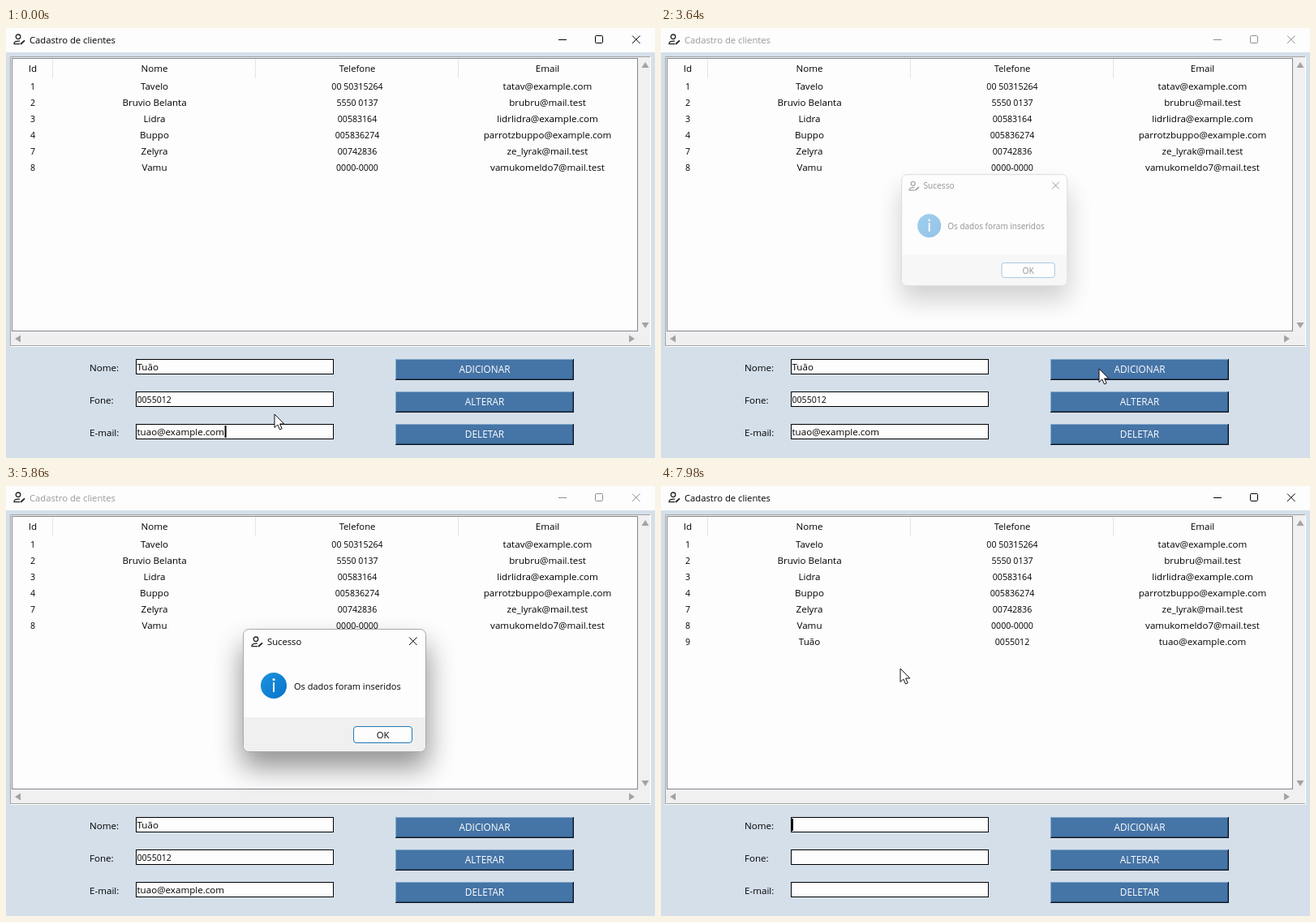
Animation, 800 px wide and 530 px high, one loop 8000 ms. Source, as an HTML page:

```html
<!DOCTYPE html>
<html lang="pt">
<head>
<meta charset="utf-8">
<title>Cadastro de clientes</title>
<style>
  html, body { margin: 0; height: 100%; overflow: hidden; background: #d4dfea; }
  svg { display: block; width: 100%; height: 100%; }
  text { font: 11.6px "Open Sans", "Noto Sans", sans-serif; fill: #000; }
  .mid { text-anchor: middle; }
  .num { font-size: 10.6px; }
  .title { font-size: 11.25px; }
  .btn { font-size: 11.8px; fill: #fff; }
  .line { fill: none; stroke: #000; }
  .inactive text { fill: #999; }
  .inactive .line { stroke: #8e8e8e; }
  #dialog { transform-origin: 337px 221px; }
  #shade { opacity: .42; filter: blur(17px); }
</style>
</head>
<body>
<svg id="stage" viewBox="0 0 800 530"></svg>
<script>
const DURATION = 8000, OPEN = 3640, DONE = 6740;
const WHITE = '#fdfdfd', PALE = '#f0f0f0', BODY = '#d4dfea', GREY = '#a3a3a3';

const rect = (x, y, w, h, fill, more = '') =>
  `<rect x="${x}" y="${y}" width="${w}" height="${h}" fill="${fill}" ${more}/>`;
const path = (d, more = 'class="line"') => `<path d="${d}" ${more}/>`;
const text = (x, y, s, cls = '', id = '') => `<text x="${x}" y="${y}" class="${cls}" id="${id}">${s}</text>`;

const userIcon = (x, y) => `<g transform="translate(${x} ${y})" fill="none" stroke="#222" stroke-width="1.3">
  <circle cx="6" cy="3.8" r="2.8"/>
  <path d="M8 12.7H1V12C1 9.5 4 8.9 8 9.1"/><path d="M9 13L14 8.300" stroke-width="1.8"/></g>`;

const columns = [33, 183, 433, 667.5];
const clients = [
  [1, 'Tavelo', '00 50315264', 'tatav@example.com'],
  [2, 'Bruvio Belanta', '5550 0137', 'brubru@mail.test'],
  [3, 'Lidra', '00583164', 'lidrlidra@example.com'],
  [4, 'Buppo', '005836274', 'parrotzbuppo@example.com'],
  [7, 'Zelyra', '00742836', 'ze_lyrak@mail.test'],
  [8, 'Vamu', '0000-0000', 'vamukomeldo7@mail.test'],
  [9, 'Tuão', '0055012', 'tuao@example.com']
];
const added = clients[6];
const row = (cells, y, cls = ['num', '', 'num', '']) =>
  cells.map((s, i) => text(columns[i], y, s, 'mid ' + cls[i])).join('');

const titleBar = rect(0, 0, 800, 30, WHITE) + userIcon(9, 7) +
  `<g id="bar">${text(29, 19, 'Cadastro de clientes', 'title')}
  ${path('M681 14.5h10M772 9.5l9.5 9.5m0-9.5L772 19')}
  <rect class="line" x="726.5" y="9.5" width="9" height="9" rx="1.2"/></g>`;

const table = rect(5.5, 35.5, 789, 357, PALE, 'stroke="#fff"') +
  path('M5.5 392V35.5H794', `fill="none" stroke="${GREY}"`) +
  path('M6 391.5H794', `stroke="${GREY}"`) +
  rect(7.5, 37.5, 771, 336, WHITE, 'stroke="#828790"') +
  path('M57.5 38v24M307.5 38v24M557.5 38v24', 'stroke="#e5e5e5"') +
  row(['Id', 'Nome', 'Telefone', 'Email'], 54, ['', '', 'title', '']) +
  clients.slice(0, 6).map((c, i) => row(c, 76 + i * 20)).join('') +
  `<g id="newRow">${row(added, 196)}</g>` +
  path('M18 378.5v9l-7-4.5zM768 378.5v9l7-4.5z', `fill="${GREY}"`) +
  path('M783.5 49h9l-4.5-7zM783.5 363h9l-4.5 7z', `id="arrows" fill="${GREY}"`) +
  rect(787, 54, 2, 303, '#858585', 'id="thumb" rx="1"');

const form = ['Nome:', 'Fone:', 'E-mail:'].map((label, i) => {
  const y = 408 + i * 40;
  return text(103, y + 15, label) + rect(160.5, y + .5, 243, 18, WHITE, 'stroke="#000"') +
    text(161.5, y + 14, added[i + 1], (i == 1 ? 'num' : '') + ' value', 'value' + i);
}).join('') + rect(0, 0, 2, 15, '#000', 'id="caret"');

const buttons = ['ADICIONAR', 'ALTERAR', 'DELETAR'].map((label, i) => {
  const y = 408 + i * 40;
  return rect(480, y, 220, 26, '#0c1420') + rect(480, y, 219, 25, '#84a9cc') +
    rect(481, y + 1, 218, 24, '#2c4b6b') + rect(481, y + 1, 217, 23, '#4574a6') +
    text(590, y + 17, label, 'mid btn');
}).join('');

const dialog = `<g id="dialog">
  <rect id="shade" x="291" y="196" width="229" height="151" rx="8"/>
  ${rect(292.5, 176.5, 225, 151, WHITE, 'rx="7" stroke="#a8a8a8"')}
  ${path('M293 285H517V320.5a6.5 6.5 0 0 1-6.5 6.5H299.5a6.5 6.5 0 0 1-6.5-6.5z', `fill="${PALE}"`)}
  ${userIcon(302, 185)}${text(322, 196, 'Sucesso', 'title')}
  ${path('M497 186.5l9.5 9.5m0-9.5L497 196')}
  <circle cx="330" cy="246" r="16" fill="url(#info)"/>
  ${rect(329, 242, 2, 12, '#fff')}<circle cx="330" cy="238.5" r="1.5" fill="#fff"/>
  <text x="355" y="251" style="font-size:11px">Os dados foram inseridos</text>
  ${rect(428.5, 296.5, 72, 20, WHITE, 'id="ok" rx="3.5" stroke="#1f78b4"')}
  ${text(464.5, 311, 'OK', 'mid title')}</g>`;

const pointer = `<g id="cursor" fill="#fff" stroke="#111" stroke-linejoin="round">
  ${path('M0 0V16.5L3.8 13L6.5 19L9.2 17.8L6.6 12H11.8z', 'id="arrow"')}
  <g id="hand">
  ${path('M-1.5 13V1.5a1.7 1.7 0 0 1 3.4 0V7q1.5-1 3 .5q1.7-.7 2.8 .8q2-.5 2.8 1.5V15q0 3-2 5v2.5H0V20L-6 13.5q-1-2 1-2.3z', '')}
  ${path('M1.9 7v4M4.9 8v3.5M7.7 9v3', 'fill="none"')}</g></g>`;

stage.innerHTML = `<defs><linearGradient id="info" x2="1" y2="1">
  <stop stop-color="#1f93dc"/><stop offset="1" stop-color="#0573cc"/></linearGradient></defs>` +
  rect(0, 0, 800, 530, BODY) + titleBar + table + form + buttons + dialog + pointer;

const el = id => document.getElementById(id);
const show = (id, on) => el(id).style.display = on ? '' : 'none';

// time, x, y
const moves = [
  [0, 331, 476], [300, 331, 476], [1800, 540, 420], [4360, 540, 420], [4740, 530, 408],
  [5400, 500, 560], [5960, 500, 560], [6400, 459, 308], [6900, 459, 308], [7900, 295, 225],
  [DURATION, 295, 225]
];
// time, opacity, scale
const fades = [
  [0, 0, .9], [OPEN, .42, .907], [3780, 1, 1], [DONE, .68, .978], [6860, .25, .94], [6960, 0, .9]
];

function pointerAt(t) {
  const i = moves.findIndex(m => m[0] > t);
  const [t0, x0, y0] = moves[i - 1], [t1, x1, y1] = moves[i];
  const u = (t - t0) / (t1 - t0), k = u * u * (3 - 2 * u);
  return [x0 + (x1 - x0) * k, y0 + (y1 - y0) * k];
}

function draw(t) {
  const modal = t >= OPEN && t < DONE, done = t >= DONE;
  el('bar').classList.toggle('inactive', modal);
  show('newRow', done);
  const hover = done && t < 7160;
  show('arrows', !hover);
  show('thumb', hover);
  document.querySelectorAll('.value').forEach(v => v.style.display = done ? 'none' : '');

  const blink = (done ? t - DONE : t + 440) % 900 < 600;
  show('caret', !modal && blink);
  el('caret').setAttribute('x', done ? 161 : 162 + el('value2').getComputedTextLength());
  el('caret').setAttribute('y', done ? 410 : 490);

  const [, opacity, scale] = fades.findLast(f => f[0] <= t);
  el('dialog').style.opacity = opacity;
  el('dialog').style.transform = `scale(${scale})`;
  show('dialog', opacity > 0);

  const [x, y] = pointerAt(t);
  const overOk = x > 428 && x < 501 && y > 296 && y < 317;
  el('ok').setAttribute('fill', overOk ? '#e0eef9' : WHITE);
  const overButton = t < OPEN && x >= 480 && x < 700 && y >= 408 && y < 434;
  show('hand', overButton);
  show('arrow', !overButton);
  el('cursor').setAttribute('transform', `translate(${x} ${y})`);
}

const start = performance.now();
(function frame() {
  draw((performance.now() - start) % DURATION);
  requestAnimationFrame(frame);
})();
</script>
</body>
</html>
```
